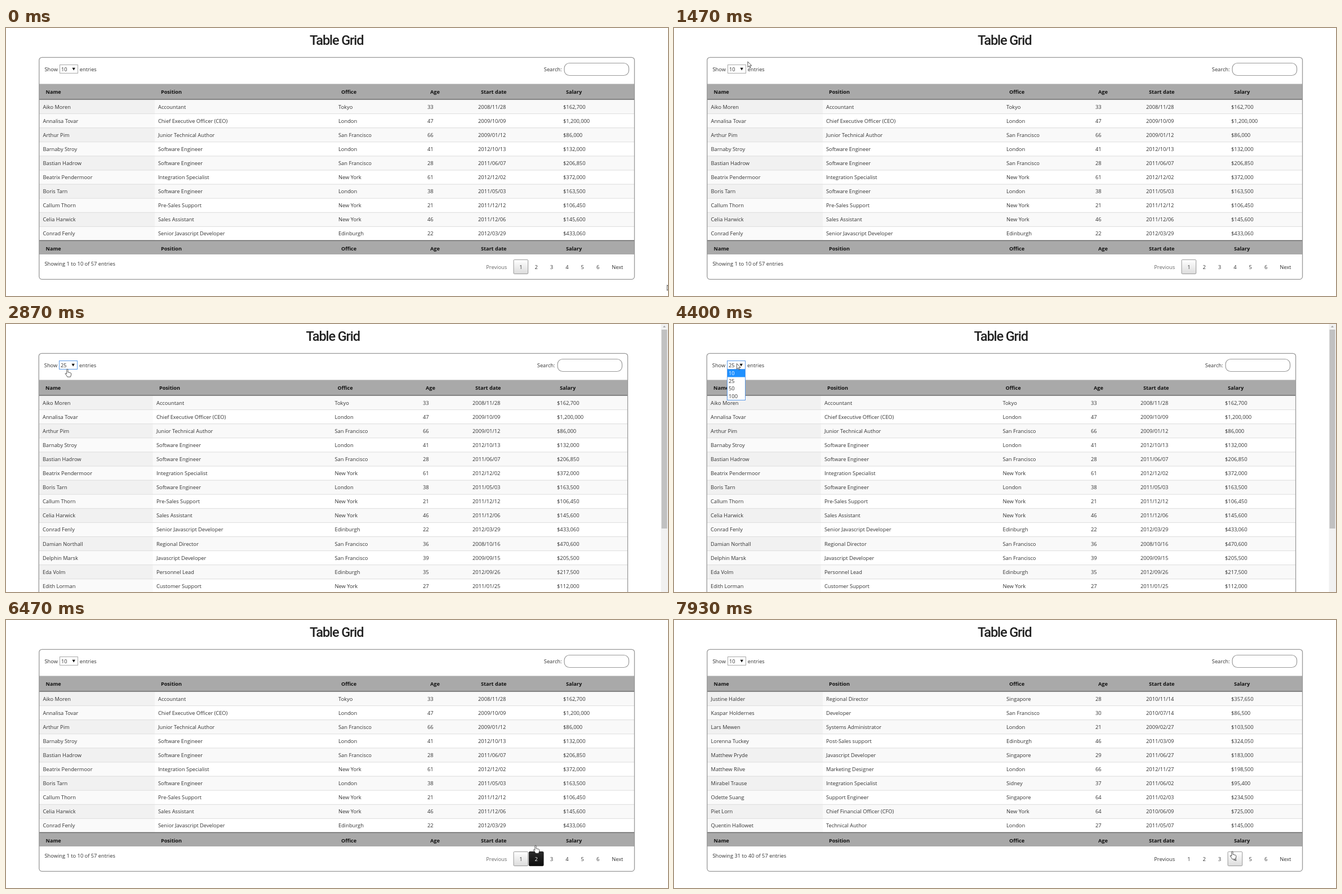
Write an HTML page that moves like this. It is 1175 px wide and 477 px high and loops after 8000 ms.

```html
<!DOCTYPE html>
<html lang="en">
<head>
<meta charset="utf-8">
<title>Table Grid</title>
<style>
  html, body { margin: 0; width: 100%; height: 100%; overflow: hidden; background: #fff; }
  svg { display: block; font: 9.3px "Open Sans", "Noto Sans", sans-serif; fill: #333; }
  .title { font: 500 23.6px Roboto, sans-serif; letter-spacing: -1.15px; fill: #222; text-anchor: middle; }
  .head { font-weight: 700; font-size: 9.1px; fill: #111; }
  .mid { text-anchor: middle; }
  .muted { fill: #666; }
  .white { fill: #fff; }
</style>
</head>
<body>
<svg width="1175" height="477" viewBox="0 0 1175 477">
  <defs>
    <linearGradient id="current" x2="0" y2="1"><stop stop-color="#fff"/><stop offset="1" stop-color="#dcdcdc"/></linearGradient>
    <linearGradient id="hover" x2="0" y2="1"><stop stop-color="#2b2b2b"/><stop offset="1" stop-color="#0c0c0c"/></linearGradient>
  </defs>
  <g id="scene"></g>
  <path id="cursor" fill="#fff" stroke="#111" stroke-width=".7" stroke-linejoin="round"/>
</svg>
<script>
const TICK = 1000 / 15, TICKS = 120, ROW = 25.1, BODY_TOP = 127.5;
const HEADS = ['Name', 'Position', 'Office', 'Age', 'Start date', 'Salary'];
const WIDE = { left: 58.8, right: 1115.5, show: 68.5, center: 586.7, nameEnd: 264, cols: [65.5, 270, 590, 748, 838, 989] };
const NARROW = { left: 58.3, right: 1103.5, show: 67.8, center: 580.2, nameEnd: 260.5, cols: [65, 267, 583.5, 740, 828, 978] };
const ARROW = 'M.4 .4V10.2L2.7 8.1 4.3 11.7 5.8 11 4.2 7.5H7.3Z';
const HAND = 'M-1.2 8.6V1.4a1.1 1.1 0 0 1 2.2 0V5.8l4.2 1q1.8.5 1.6 2.5L6.2 12 5.4 14.2H0L-2 11-4 8.4q.9-1.4 2.8.2Z';

const rows = `Aiko Moren|Accountant|Tokyo|33|2008/11/28|$162,700
Annalisa Tovar|Chief Executive Officer (CEO)|London|47|2009/10/09|$1,200,000
Arthur Pim|Junior Technical Author|San Francisco|66|2009/01/12|$86,000
Barnaby Stroy|Software Engineer|London|41|2012/10/13|$132,000
Bastian Hadrow|Software Engineer|San Francisco|28|2011/06/07|$206,850
Beatrix Pendermoor|Integration Specialist|New York|61|2012/12/02|$372,000
Boris Tarn|Software Engineer|London|38|2011/05/03|$163,500
Callum Thorn|Pre-Sales Support|New York|21|2011/12/12|$106,450
Celia Harwick|Sales Assistant|New York|46|2011/12/06|$145,600
Conrad Fenly|Senior Javascript Developer|Edinburgh|22|2012/03/29|$433,060
Damian Northall|Regional Director|San Francisco|36|2008/10/16|$470,600
Delphin Marsk|Javascript Developer|San Francisco|39|2009/09/15|$205,500
Eda Volm|Personnel Lead|Edinburgh|35|2012/09/26|$217,500
Edith Lorman|Customer Support|New York|27|2011/01/25|$112,000
Elsie Rowden|Sales Assistant|Sidney|23|2010/09/20|$85,600
Emil Kasparo|Support Engineer|San Francisco|47|2009/07/07|$87,500
Erika Stond|Chief Operating Officer (COO)|San Francisco|48|2010/03/11|$850,000
Everett Maddows|Accountant|Tokyo|63|2011/07/25|$170,750
Felix Norden|Team Leader|San Francisco|22|2008/10/26|$235,500
Felix Prund|Developer|Edinburgh|42|2010/12/22|$92,575
Gilda Morten|Systems Administrator|New York|59|2009/04/10|$237,500
Hanna Quilley|Senior Marketing Designer|London|43|2012/12/18|$313,500
Henrietta Coler|Regional Director|London|47|2011/03/21|$356,250
Hubert Langmere|Sales Assistant|San Francisco|59|2012/08/06|$137,500
Ilsa Corvany|Secretary|San Francisco|41|2010/02/12|$109,850
Ingram Thorley|Office Manager|San Francisco|51|2008/12/16|$164,500
Jasper Hollomark|Director|New York|65|2008/09/26|$645,750
Joan Merick|Office Manager|London|30|2008/12/19|$90,560
Josette Farnwell|Development Lead|New York|30|2011/09/03|$345,000
Judith Arlova|Junior Javascript Developer|Edinburgh|43|2013/02/01|$75,650
Justine Halder|Regional Director|Singapore|28|2010/11/14|$357,650
Kaspar Holdernes|Developer|San Francisco|30|2010/07/14|$86,500
Lars Mewen|Systems Administrator|London|21|2009/02/27|$103,500
Lorenna Tuckey|Post-Sales support|Edinburgh|46|2011/03/09|$324,050
Matthew Pryde|Javascript Developer|Singapore|29|2011/06/27|$183,000
Matthew Rilve|Marketing Designer|London|66|2012/11/27|$198,500
Mirabel Trause|Integration Specialist|Sidney|37|2011/06/02|$95,400
Odette Suang|Support Engineer|Singapore|64|2011/02/03|$234,500
Piet Lorn|Chief Financial Officer (CFO)|New York|64|2010/06/09|$725,000
Quentin Hallowet|Technical Author|London|27|2011/05/07|$145,000`.split('\n').map(line => line.split('|'));

// Cursor moves: start tick, end tick, x, y
const moves = [
  [7, 12, 800, 330], [12, 16, 200, 140], [16, 18, 60, 90], [18, 20, 199, 74], [20, 21, 150, 70], [21, 22, 130.5, 59.5],
  [24, 29, 120, 52], [31, 34, 113, 73], [36, 38, 112, 95], [42, 43, 109, 80], [49, 53, 111, 65], [54, 56, 112, 59],
  [57, 59, 112, 57], [60, 66, 111, 70], [80, 83, 69, 190], [83, 86, 250, 400], [86, 89, 700, 465], [89, 91, 930, 460],
  [91, 93, 941, 420], [93, 95, 940, 401], [99, 107, 968, 410], [110, 115, 991, 411.5]
];

const text = (x, y, s, cls = '') => `<text x="${x}" y="${y}" class="${cls}">${s}</text>`;
const rect = (x, y, w, h, fill, more = '') => `<rect x="${x}" y="${y}" width="${w}" height="${h}" fill="${fill}" ${more}/>`;
const between = (k, a, b) => k >= a && k < b;

function stateAt(k) {
  return {
    narrow: between(k, 42, 73),
    page: k < 98 ? 0 : k < 110 ? 1 : k < 118 ? 2 : 3,
    hover: between(k, 92, 98) ? 2 : between(k, 102, 110) ? 3 : between(k, 113, 118) ? 4 : 0,
    focus: between(k, 25, 97),
    menu: between(k, 25, 42) || between(k, 61, 73),
    picked: between(k, 37, 66) ? 1 : 0
  };
}

function drawBand(layout, y, height, baseline) {
  const { left, right, cols } = layout;
  return rect(left, y, right - left, height, '#a9a9a9') +
    HEADS.map((head, i) => text(cols[i] + 5, baseline, head, 'head')).join('');
}

function drawRows(layout, list) {
  const { left, right, nameEnd, cols } = layout;
  return list.map((cells, i) => {
    const y = BODY_TOP + i * ROW, odd = i % 2 === 0;
    return rect(left, y, right - left, ROW, odd ? '#f9f9f9' : '#fff') +
      rect(left, y, nameEnd - left, ROW, odd ? '#f1f1f1' : '#fafafa') +
      (i ? rect(left, y - .5, right - left, 1, '#ddd') : '') +
      cells.map((cell, c) => text(cols[c], (y + 16).toFixed(1), cell)).join('');
  }).join('');
}

function drawPager(page, hover) {
  let out = text(68.5, 423, `Showing ${page * 10 + 1} to ${page * 10 + 10} of 57 entries`) +
    text(870.7, 428.8, 'Previous', page ? 'mid' : 'mid muted') + text(1085.3, 428.8, 'Next', 'mid');
  for (let n = 1; n <= 6; n++) {
    const x = 913.8 + (n - 1) * 27.35, current = n === page + 1, hot = n === hover;
    if (current || hot)
      out += rect(x - 12.8, 412.4, 25.6, 25.2, `url(#${hot ? 'hover' : 'current'})`, `rx="1.5" stroke="${hot ? '#111' : '#979797'}"`);
    out += text(x, 428.8, n, hot ? 'mid white' : 'mid');
  }
  return out;
}

function drawControls(layout, s) {
  const { show, right } = layout, x = Math.floor(show) + 27.5, edge = s.focus ? '#5b9ae8' : '#a9a9a9';
  let out = text(show, 77, 'Show') + rect(x, 65.5, 32, 15, '#fff', `stroke="${edge}"`) +
    text(x + 2.5, 77, s.narrow ? 25 : 10) + `<path d="M${x + 22} 70.7h5.4l-2.7 4.8z" fill="#111"/>` +
    text(show + 62.3, 77, 'entries') + text(right - 160.7, 77, 'Search:') +
    rect(right - 124.5, 62.5, 114.5, 22, '#fff', 'rx="9" stroke="#999" stroke-width="1.2"');
  if (s.menu) {
    out += rect(x, 80.5, 32, 55, '#fff', `stroke="${edge}"`) + rect(x + .5, 81 + s.picked * 13.5, 31, 13.5, '#1e90ff');
    [10, 25, 50, 100].forEach((n, i) => out += text(x + 2.5, 91.3 + i * 13.5, n, i === s.picked ? 'white' : ''));
  }
  return out;
}

function drawScene(s) {
  const layout = s.narrow ? NARROW : WIDE, { left, right, center } = layout, width = right - left;
  const list = s.narrow ? rows.slice(0, 14) : rows.slice(s.page * 10, s.page * 10 + 10);
  let out = text(center, 30, 'Table Grid', 'title') + drawBand(layout, 99.5, 28, 117) + drawRows(layout, list) +
    rect(left, 126.6, width, 1, '#444');
  if (s.narrow)
    out += rect(1162.5, 0, 12.5, 477, '#f1f1f1') + rect(1163.5, 10, 10, 354, '#c1c1c1') +
      '<path d="M1166 6h5l-2.5-3z" fill="#a3a3a3"/>';
  else
    out += drawBand(layout, 378, 25, 395.6) + rect(left, 377.7, width, 1, '#444') + drawPager(s.page, s.hover);
  return out + rect(left, 52.3, width, s.narrow ? 600 : 395, 'none', 'rx="5" stroke="#999" stroke-width="1.3"') +
    drawControls(layout, s);
}

function cursorAt(k) {
  let x = 1173, y = 457;
  for (const [start, end, toX, toY] of moves) {
    if (k <= start) break;
    const p = Math.min(1, (k - start) / (end - start));
    x += (toX - x) * p;
    y += (toY - y) * p;
  }
  return [x, y];
}

const scene = document.getElementById('scene'), cursor = document.getElementById('cursor');
let shown = '';

function render(now) {
  const k = Math.floor((now + 4) / TICK) % TICKS, state = stateAt(k), key = JSON.stringify(state);
  if (key !== shown) {
    scene.innerHTML = drawScene(state);
    shown = key;
  }
  cursor.setAttribute('d', between(k, 43, 51) || k >= 92 ? HAND : ARROW);
  cursor.setAttribute('transform', `translate(${cursorAt(k)})`);
  requestAnimationFrame(render);
}
render(performance.now());
</script>
</body>
</html>
```
